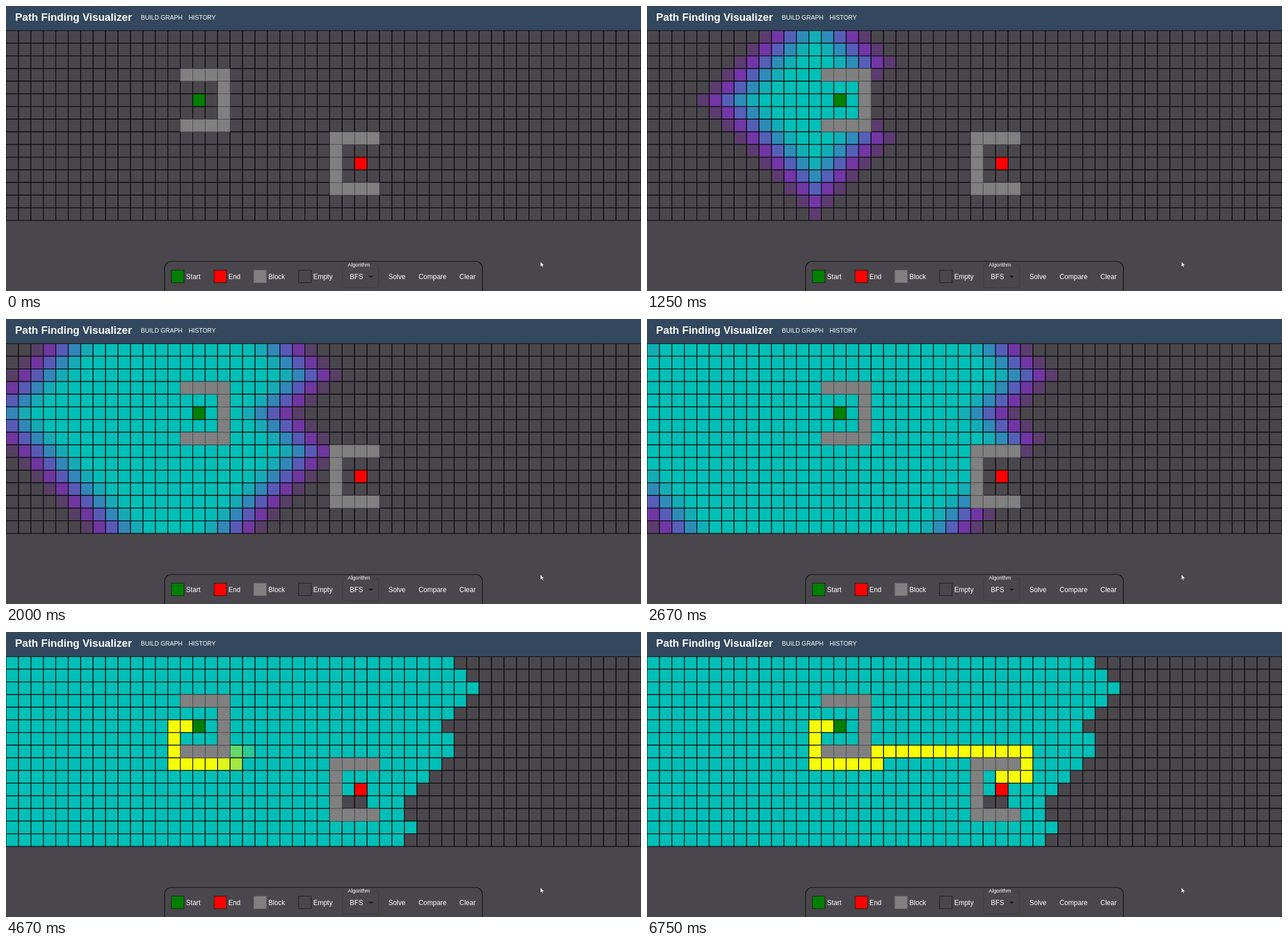
Write an HTML page that moves like this. It is 1117x501 px and loops after 6.83 s.

```html
<!DOCTYPE html>
<html lang="en">
<head>
<meta charset="utf-8">
<title>Path Finding Visualizer</title>
<style>
  html, body { margin: 0; width: 100%; height: 100%; overflow: hidden; background: #4a474c; }
  svg { display: block; width: 100%; height: 100%; }
  text { font-family: "Liberation Sans", Arial, sans-serif; font-size: 12px; fill: #fff; }
  .title { font-size: 18.72px; font-weight: bold; }
  .nav { font-size: 10.8px; }
  .label { font-size: 9.2px; }
</style>
</head>
<body>
<svg id="stage" viewBox="0 0 1117 501">
  <rect width="1117" height="501" fill="#4a474c"/>
  <g id="grid"></g>
  <rect width="1117" height="42.6" fill="#33485e"/>
  <text class="title" x="16" y="26.3">Path Finding Visualizer</text>
  <text class="nav" x="237.2" y="24">BUILD GRAPH</text>
  <text class="nav" x="321.3" y="24">HISTORY</text>
  <path d="M279 503V461a12 12 0 0 1 12-12H826a12 12 0 0 1 12 12V503" fill="none" stroke="#0c0c0d" stroke-width="1.2"/>
  <g id="legend"></g>
  <rect x="592" y="456" width="63.5" height="39.5" rx="3" fill="none" stroke="#3e3b40"/>
  <rect x="598" y="453" width="45" height="6" fill="#4a474c"/>
  <text class="label" x="601.3" y="458.2">Algorithm</text>
  <text x="604.8" y="479.6">BFS</text>
  <path d="M637.5 474h8.6l-4.3 4.3z" fill="#1b1a1c"/>
  <text x="672.7" y="479.6">Solve</text>
  <text x="725.7" y="479.6">Compare</text>
  <text x="797.5" y="479.6">Clear</text>
  <path d="M940 449v9.6l2.2-2 1.5 3.4 1.5-.7-1.5-3.2h2.9z" fill="#fff" stroke="#222" stroke-width=".6"/>
</svg>
<script>
const COLS = 51, ROWS = 15, TOP = 43.2;
const W = 1117 / COLS, H = 22.25;
const LOOP = 6830, TICK = 1000 / 12, STEP = 109.2;
const EMPTY = [74, 71, 76], YELLOW = [246, 253, 8];
const START = [15, 5], END = [28, 10];
const PATH_LEVEL = 30, PATH_FADE = 455;

// age in ms, then the colour reached
const VISIT = [
  [0, EMPTY], [49, [92, 60, 112]], [158, [114, 54, 166]], [267, [85, 95, 184]],
  [376, [46, 140, 184]], [485, [18, 174, 181]], [595, [0, 191, 182]]
];

const key = (x, y) => y * COLS + x;
const mix = (a, b, p) => a.map((v, i) => v + (b[i] - v) * p);
const css = c => `rgb(${c.map(Math.round)})`;

function add(parent, tag, attrs, text) {
  const el = document.createElementNS("http://www.w3.org/2000/svg", tag);
  for (const name in attrs) el.setAttribute(name, attrs[name]);
  if (text) el.textContent = text;
  return parent.appendChild(el);
}

const walls = new Set();
function bracket(x, y, side) {
  for (let i = 0; i < 4; i++) walls.add(key(x + i, y)).add(key(x + i, y + 4));
  for (let j = 1; j < 4; j++) walls.add(key(side, y + j));
}
bracket(14, 3, 17);
bracket(26, 8, 26);

function distances() {
  const dist = new Map([[key(...START), 0]]);
  const queue = [START];
  for (const [x, y] of queue) {
    for (const [dx, dy] of [[1, 0], [-1, 0], [0, 1], [0, -1]]) {
      const nx = x + dx, ny = y + dy, k = key(nx, ny);
      if (nx < 0 || ny < 0 || nx >= COLS || ny >= ROWS) continue;
      if (walls.has(k) || dist.has(k)) continue;
      dist.set(k, dist.get(key(x, y)) + 1);
      queue.push([nx, ny]);
    }
  }
  return dist;
}

function tracePath() {
  const order = new Map();
  const moves = { L: [-1, 0], R: [1, 0], U: [0, -1], D: [0, 1] };
  let [x, y] = START, n = 0;
  for (const [dir, count] of [["L", 2], ["D", 3], ["R", 5], ["U", 1], ["R", 12], ["D", 2], ["L", 2]]) {
    for (let i = 0; i < count; i++) {
      x += moves[dir][0];
      y += moves[dir][1];
      order.set(key(x, y), ++n);
    }
  }
  return order;
}

// The last level is only partly explored when the search stops.
const reached = (d, x, y) => d <= 28 || (d === 29 && (y < 7 || y > 11 || x === 27));

const grid = document.getElementById("grid");
const dist = distances(), order = tracePath();
const cells = [];

function drawCell(x, y, fill, stroke = "#080809", width = 1.3) {
  return add(grid, "rect", {
    x: x * W, y: TOP + y * H, width: W, height: H, fill, stroke, "stroke-width": width
  });
}

for (let y = 0; y < ROWS; y++) {
  for (let x = 0; x < COLS; x++) {
    const k = key(x, y);
    const el = drawCell(x, y, css(EMPTY));
    const d = dist.get(k);
    if (d > 0 && reached(d, x, y)) cells.push({ el, d, n: order.get(k) });
  }
}
for (const k of walls) drawCell(k % COLS, Math.floor(k / COLS), "#808080", "#4c4b4d", 1);
drawCell(...START, "#008000");
drawCell(...END, "#ff0000");

const legend = document.getElementById("legend");
for (const [x, fill, name, tx] of [
  [291, "#008000", "Start", 316.8], [366, "#ff0000", "End", 391.2],
  [436, "#808080", "Block", 461.5], [514.8, "#4a474c", "Empty", 540.4]
]) {
  add(legend, "rect", {
    x, y: 464.4, width: 22, height: 22, fill,
    stroke: name === "Block" ? "#6a696b" : "#1c1b1d", "stroke-width": 1
  });
  add(legend, "text", { x: tx, y: 479.6 }, name);
}

function visitColor(age) {
  if (age <= 0) return EMPTY;
  const i = VISIT.findIndex(([at]) => at > age);
  if (i < 0) return VISIT[VISIT.length - 1][1];
  const [t0, a] = VISIT[i - 1], [t1, b] = VISIT[i];
  return mix(a, b, (age - t0) / (t1 - t0));
}

function render(ms) {
  const t = Math.floor((ms % LOOP + 4) / TICK) * TICK;
  for (const c of cells) {
    let color = visitColor(t - c.d * STEP);
    if (c.n) {
      const p = (t - (PATH_LEVEL + c.n) * STEP) / PATH_FADE;
      color = mix(color, YELLOW, Math.min(1, Math.max(0, p)));
    }
    const fill = css(color);
    if (fill !== c.fill) c.el.setAttribute("fill", c.fill = fill);
  }
}

const begin = performance.now();
function loop() {
  render(performance.now() - begin);
  requestAnimationFrame(loop);
}
loop();
</script>
</body>
</html>
```
